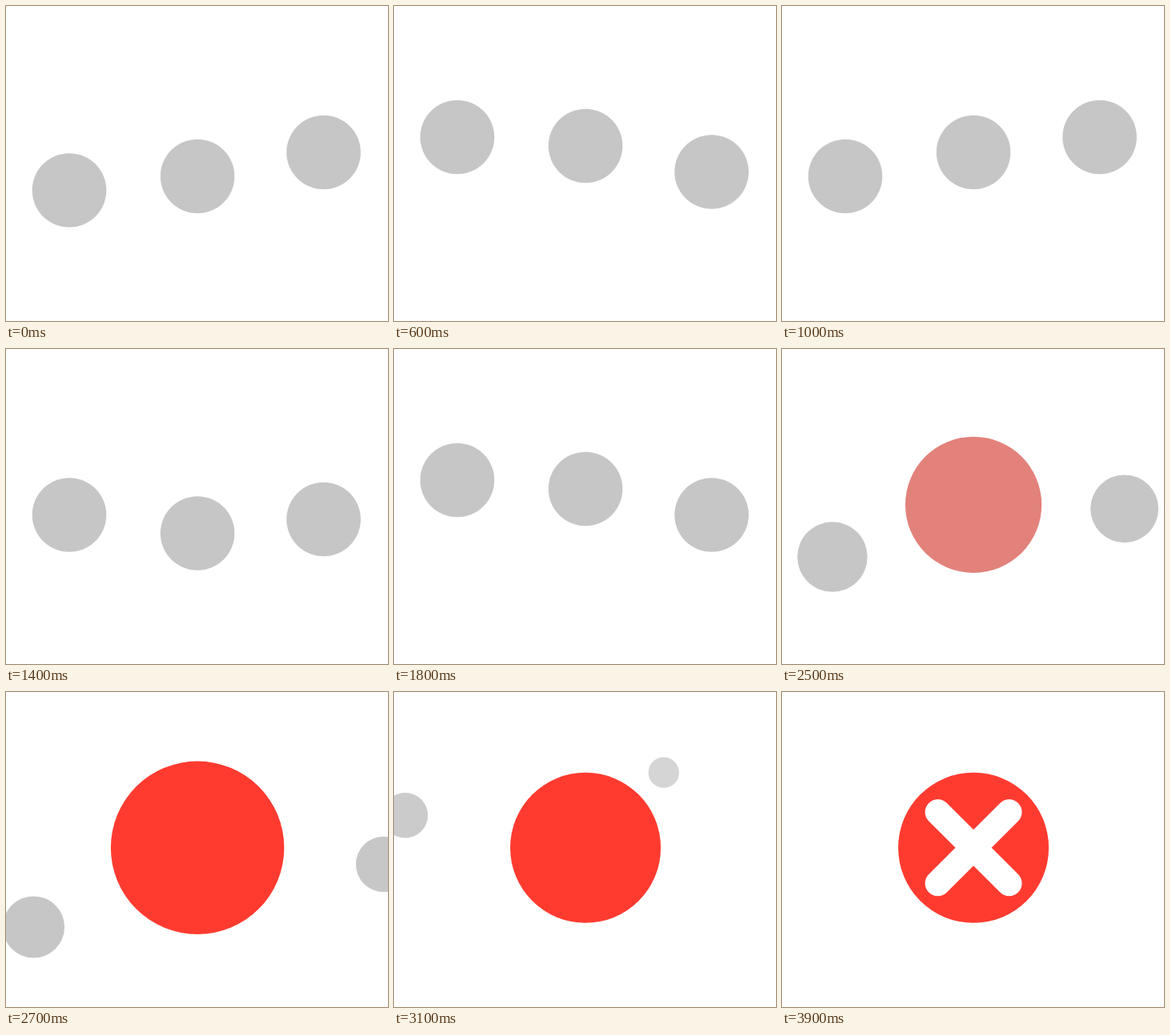
An HTML page that plays this animation: 477 by 394 pixels, repeating every 4800 ms.

```html
<!DOCTYPE html>
<html lang="en">
<head>
<meta charset="utf-8">
<title>Loader to error mark</title>
<style>
  html, body { margin: 0; width: 100%; height: 100%; overflow: hidden; background: #fff; }
  svg { display: block; width: 477px; height: 394px; }
</style>
</head>
<body>
<svg viewBox="0 0 477 394">
  <circle id="left" fill="#c6c6c6"/>
  <circle id="right" fill="#c6c6c6"/>
  <circle id="middle"/>
  <path id="cross" d="M-44.5-44.5 44.5 44.5M44.5-44.5-44.5 44.5" fill="none"
        stroke="#fff" stroke-width="32" stroke-linecap="round"/>
</svg>
<script>
const LOOP = 4800, STEP = 100, BOUNCE = 1200, LAG = 200;
const SETTLE = 2200, LEAVE = 2400, CROSS = 3400;
const RADIUS = 46.3, DISC = 94, CX = 239.1, CY = 194.8;
const GREY = [198, 198, 198], RED = [255, 59, 48];
const [left, right, middle, cross] =
  ['left', 'right', 'middle', 'cross'].map(id => document.getElementById(id));

// Key points of the exits: time, x, y
const leftPath = [
  [LEAVE, 79, 232.5], [2700, 34.5, 294], [3100, 14, 154.3], [3500, CX, CY]
];
const rightPath = [
  [LEAVE, 396.6, 183], [2700, 471.5, 215.5], [3000, 382.5, 86.5],
  [3100, 336.8, 100.8], [3500, CX, CY]
];

const ramp = (t, start, span) => Math.min(Math.max((t - start) / span, 0), 1);
const mix = (a, b, u) => a + (b - a) * u;
const backOut = (u, c) => 1 + (c + 1) * (u - 1) ** 3 + c * (u - 1) ** 2;

// Smooth curve through timed points, held at the end
function follow(path, t) {
  const last = path.length - 1;
  if (t >= path[last][0]) return path[last].slice(1);
  const i = path.findIndex(p => p[0] > t) - 1;
  const a = path[i], b = path[i + 1];
  const before = path[Math.max(i - 1, 0)], after = path[Math.min(i + 2, last)];
  const span = b[0] - a[0], u = (t - a[0]) / span, w = 1 - u;
  return [1, 2].map(n => {
    const m0 = (b[n] - before[n]) / (b[0] - before[0]) * span;
    const m1 = (after[n] - a[n]) / (after[0] - a[0]) * span;
    return a[n] * (1 + 2 * u) * w * w + m0 * u * w * w
         + b[n] * (1 + 2 * w) * u * u - m1 * u * u * w;
  });
}

function bounceY(t) {
  const p = t / BOUNCE * 2 * Math.PI;
  return 195.5 + 32.8 * Math.cos(p + 0.12) + 1.9 * Math.cos(2 * p - 0.4)
       + 0.67 * Math.cos(3 * p);
}

function place(el, x, y, r) {
  el.setAttribute('cx', x);
  el.setAttribute('cy', y);
  el.setAttribute('r', r);
}

function drawSide(el, t, lag, path, life) {
  const [x, y] = t < LEAVE ? [path[0][1], bounceY(t - lag)] : follow(path, t);
  const shrink = ramp(t, LEAVE, life);
  place(el, x, y, RADIUS * (1 - shrink));
  el.setAttribute('opacity', 1 - shrink ** 2.5);
}

function drawMiddle(t) {
  const y = mix(bounceY(Math.min(t, SETTLE) - LAG), CY, ramp(t, SETTLE, 200));
  const grow = backOut(ramp(t, LEAVE, 600), 3.39);
  const tint = ramp(t, LEAVE, 200);
  place(middle, CX, y, mix(RADIUS, DISC, grow));
  middle.setAttribute('fill',
    `rgb(${GREY.map((c, i) => Math.round(mix(c, RED[i], tint)))})`);
}

function drawCross(t) {
  const scale = backOut(ramp(t, CROSS, 500), 1.8);
  const y = CY - 95 * (scale - 1);
  cross.setAttribute('transform', `translate(${CX} ${y}) scale(${scale})`);
  cross.setAttribute('visibility', t > CROSS ? 'visible' : 'hidden');
}

function draw(t) {
  drawSide(left, t, 0, leftPath, 1800);
  drawSide(right, t, 2 * LAG, rightPath, 1195);
  drawMiddle(t);
  drawCross(t);
}

function tick() {
  const t = performance.now() % LOOP;
  draw(Math.floor(t / STEP) * STEP);
  requestAnimationFrame(tick);
}
tick();
</script>
</body>
</html>
```
